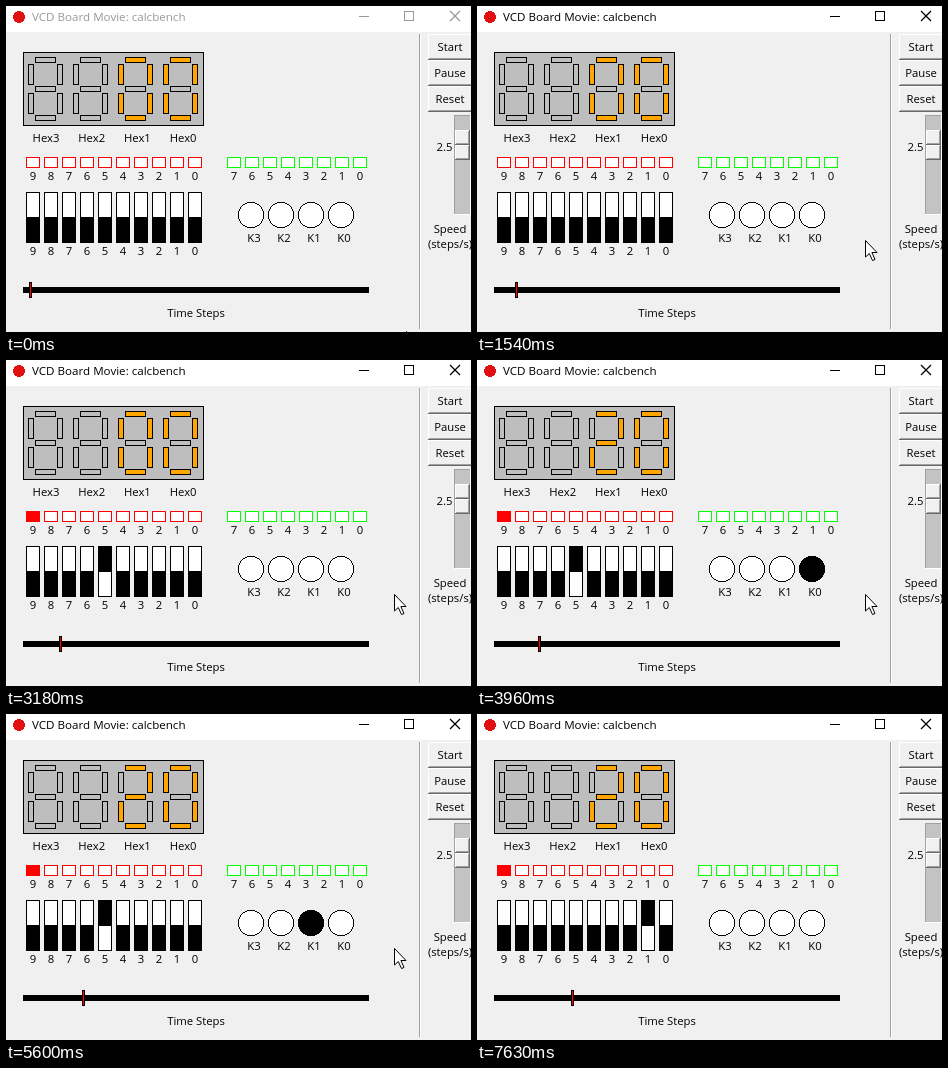
Write an HTML page with a canvas that moves like this. It is 465 px wide and 326 px high and loops after 8000 ms.

```html
<!DOCTYPE html>
<html lang="en">
<head>
<meta charset="utf-8">
<title>VCD Board Movie</title>
<style>
html, body { margin: 0; width: 100%; height: 100%; overflow: hidden; background: #f0f0f0; }
canvas { display: block; width: 465px; height: 326px; }
</style>
</head>
<body>
<canvas id="stage" width="465" height="326"></canvas>
<script>
const ctx = document.getElementById('stage').getContext('2d');
const FONT = '"Open Sans", "Noto Sans", sans-serif';
const LOOP = 8000;
const STEP_MS = 400; // 2.5 steps per second
const LEAD_MS = 60;
const LAST_STEP = 19;

// Lit segments: a top, b and c right, d bottom, e and f left, g middle
const GLYPHS = { ' ': '', 0: 'abcdef', 2: 'abged' };

const clamp = v => Math.min(1, Math.max(0, v));

function rect(x, y, w, h, fill) {
  ctx.fillStyle = fill;
  ctx.fillRect(x, y, w, h);
}

function box(x, y, w, h, fill, edge = '#000') {
  rect(x, y, w, h, edge);
  rect(x + 1, y + 1, w - 2, h - 2, fill);
}

function text(str, x, y, align = 'center', size = 11.3, color = '#000') {
  ctx.font = `${size}px ${FONT}`;
  ctx.textAlign = align;
  ctx.fillStyle = color;
  ctx.fillText(str, x, y);
}

function line(x1, y1, x2, y2, color, width) {
  ctx.beginPath();
  ctx.moveTo(x1, y1);
  ctx.lineTo(x2, y2);
  ctx.strokeStyle = color;
  ctx.lineWidth = width;
  ctx.stroke();
}

// Disc built from whole pixel rows, so its edge stays hard
function disc(x, y, r, fill) {
  for (let row = -Math.ceil(r); row < r; row++) {
    const rest = r * r - (row + 0.5) ** 2;
    if (rest <= 0) continue;
    const half = Math.round(Math.sqrt(rest));
    rect(x - half, y + row, half * 2, 1, fill);
  }
}

function raised(x, y, w, h) {
  rect(x, y, w, h, '#696969');
  rect(x, y, w - 1, h - 1, '#fff');
  rect(x + 1, y + 1, w - 2, h - 2, '#a0a0a0');
  rect(x + 1, y + 1, w - 3, h - 3, '#f0f0f0');
}

function drawTitle(active) {
  const ink = active ? '#000' : '#999';
  rect(0, 0, 465, 26, '#fff');
  disc(13, 11, 6, '#e01010');
  text('VCD Board Movie: calcbench', 26, 15, 'left', 11.6, ink);
  rect(353, 10, 10, 1, ink);
  box(398, 5, 10, 10, '#fff', ink);
  line(444, 5, 454, 15, ink, 1.2);
  line(454, 5, 444, 15, ink, 1.2);
}

function drawControls() {
  rect(413, 28, 1, 295, '#a0a0a0');
  rect(414, 28, 1, 295, '#fff');
  ['Start', 'Pause', 'Reset'].forEach((name, i) => {
    raised(422, 28 + i * 26, 46, 26);
    text(name, 444, 45 + i * 26);
  });
  rect(448, 109, 17, 100, '#fff');
  rect(448, 109, 16, 99, '#a0a0a0');
  rect(449, 110, 15, 98, '#c3c3c3');
  raised(449, 124, 15, 15);
  raised(449, 139, 15, 15);
  text('2.5', 438.5, 145);
  text('Speed', 444, 227);
  text('(steps/s)', 444, 242);
}

function drawDigit(x, digit) {
  const fill = name => GLYPHS[digit].includes(name) ? '#ffa500' : '#bebebe';
  [...'agd'].forEach((name, i) => box(x + 7, 51 + i * 29, 21, 6, fill(name)));
  [...'fbec'].forEach((name, i) =>
    box(x + (i % 2) * 29, 58 + (i >> 1) * 29, 6, 21, fill(name)));
}

function drawHex(digits) {
  box(17, 46, 181, 74, '#bebebe');
  [...digits].forEach((digit, i) => {
    drawDigit(22 + i * 45, digit);
    text('Hex' + (3 - i), 40 + i * 45.7, 136);
  });
}

function drawLeds(x, count, color, lit) {
  for (let i = 0; i < count; i++) {
    const id = count - 1 - i;
    box(x + i * 18, 151, 14, 11, id === lit ? color : '#fff', color);
    text(id, x + 7 + i * 18, 174);
  }
}

function drawSwitches(up) {
  for (let i = 0; i < 10; i++) {
    const id = 9 - i, x = 20 + i * 18;
    box(x, 186, 14, 51, '#fff');
    rect(x, id === up ? 186 : 211, 14, 26, '#000');
    text(id, x + 7, 249);
  }
}

function drawKeys(pressed) {
  for (let i = 0; i < 4; i++) {
    const id = 3 - i, x = 245 + i * 30;
    disc(x, 209, 13, '#000');
    if (id !== pressed) disc(x, 209, 12.3, '#fff');
    text('K' + id, x + 3, 236);
  }
}

function drawTimeline(step) {
  rect(17, 281, 346, 6, '#000');
  box(Math.round(23 + step * 3.75), 276, 3, 16, '#f00');
  text('Time Steps', 190, 311);
}

// The pointer glides in from below, rests, then drops out again
function drawPointer(t) {
  const away = (1 - clamp(t / 300)) ** 2;
  const leaving = t >= 5750;
  const drop = clamp((t - 6080) / 100);
  const x = (leaving ? 389 : 388) + 12 * away;
  const y = leaving ? 228 + 98 * drop : 234 + 92 * away;

  ctx.save();
  ctx.translate(Math.round(x) + 0.5, Math.round(y) + 0.5);
  ctx.fillStyle = '#fff';
  ctx.strokeStyle = '#000';
  ctx.lineWidth = 1;
  const arrow = new Path2D('M0 0V16.5L3.8 13L7 20L9.5 19L6.4 12H11.5Z');
  ctx.fill(arrow);
  ctx.stroke(arrow);
  ctx.restore();
}

function draw(t) {
  const step = Math.min(LAST_STEP, Math.floor((t + LEAD_MS) / STEP_MS));
  const firstMove = step >= 8, secondMove = step >= LAST_STEP;
  // The clock holds still whenever a switch is moved
  const clock = (step - firstMove - secondMove) % 2 === 1;
  const up = secondMove ? 1 : firstMove ? 5 : -1;
  const heldFrom = start => step === start || step === start + 1;
  const key = heldFrom(9) ? 0 : heldFrom(13) ? 1 : -1;

  rect(0, 0, 465, 326, '#f0f0f0');
  drawTitle(t >= 300);
  drawControls();
  drawHex(step >= 10 ? '  20' : '  00');
  drawLeds(20, 10, '#f00', clock ? 9 : -1);
  drawLeds(221, 8, '#0f0', -1);
  drawSwitches(up);
  drawKeys(key);
  drawTimeline(step);
  drawPointer(t);
}

const began = performance.now();
function tick() {
  draw((performance.now() - began) % LOOP);
  requestAnimationFrame(tick);
}
tick();
</script>
</body>
</html>
```
